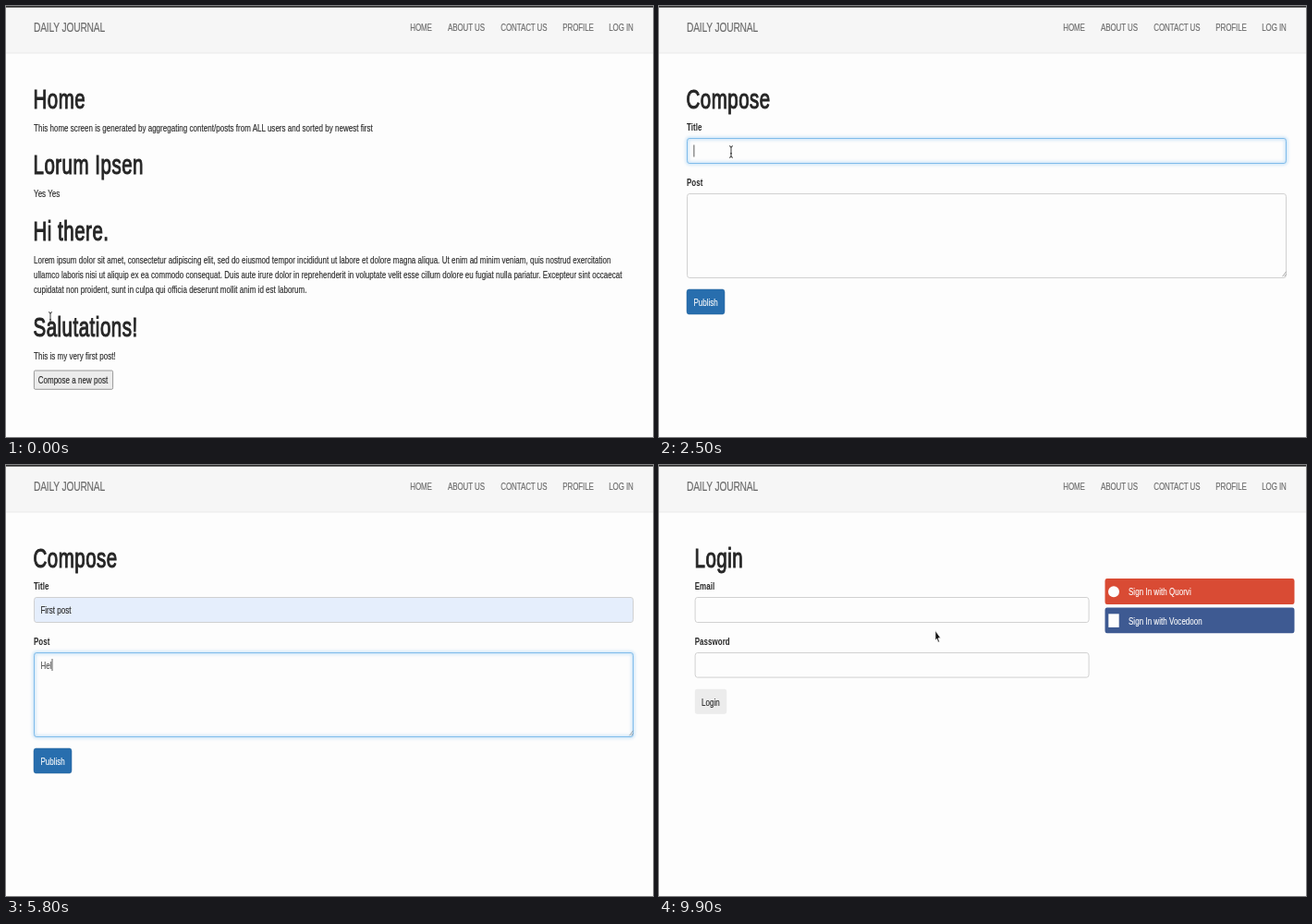
An HTML page that plays this animation: 700 by 467 pixels, repeating every 10000 ms.

```html
<!DOCTYPE html>
<html lang="en">
<head>
<meta charset="utf-8">
<title>Daily Journal</title>
<style>
  html, body { margin: 0; width: 100%; height: 100%; overflow: hidden; background: #fdfdfd; }
  svg { display: block; width: 100%; height: 100%; }
  text { font-family: "Liberation Sans", Arial, sans-serif; white-space: pre; }
  .glow { filter: blur(1.4px); }
</style>
</head>
<body>
<svg id="stage" viewBox="0 0 700 467"></svg>
<script>
const NS = 'http://www.w3.org/2000/svg';
const LOOP = 10000, STEP = 100;
// The whole page is shown squeezed by these factors.
const SX = 0.569, SY = 0.814;
const INK = '#262626', PAPER = '#fdfdfd', LINE = '#cccccc', FOCUS = '#78b8ea', NAV = '#6a6a6a';

function el(parent, tag, attrs) {
  const node = document.createElementNS(NS, tag);
  for (const key in attrs) node.setAttribute(key, attrs[key]);
  parent.appendChild(node);
  return node;
}

function text(parent, x, y, str, attrs) {
  const fill = attrs?.fill ?? INK;
  const node = el(parent, 'text', {
    transform: `translate(${x} ${y}) scale(${SX} ${SY})`,
    'font-size': 14, 'letter-spacing': 0.08, fill, stroke: fill, 'stroke-width': 0.2, ...attrs
  });
  node.textContent = str;
  return node;
}

const heading = (parent, x, y, str) => text(parent, x, y, str,
  { 'font-size': 36, 'letter-spacing': 0.9, 'stroke-width': 1.4 });

const label = (parent, x, y, str) => text(parent, x, y, str, { 'font-weight': 700, 'stroke-width': 0 });

const box = (parent, x, y, width, height, fill, attrs) => el(parent, 'rect',
  { x, y, width, height, rx: 2.3, ry: 3.2, fill, ...attrs });

const field = (parent, x, y, w, h) => box(parent, x + 0.5, y + 0.5, w - 1, h - 1, PAPER,
  { stroke: LINE, 'stroke-width': 0.9 });

function focusRing(parent, x, y, w, h) {
  const g = el(parent, 'g', {});
  const edge = { x: x + 0.5, y: y + 0.5, width: w - 1, height: h - 1, rx: 2.3, ry: 3.2, fill: 'none' };
  el(g, 'rect', { ...edge, class: 'glow', stroke: '#cfe6f8', 'stroke-width': 4 });
  el(g, 'rect', { ...edge, stroke: FOCUS, 'stroke-width': 0.9 });
  return g;
}

const show = (node, on) => node.setAttribute('display', on ? 'inline' : 'none');
const fade = (node, v) => node.setAttribute('opacity', v);

const stage = document.getElementById('stage');
el(stage, 'rect', { width: 700, height: 467, fill: PAPER });

// Navigation bar
el(stage, 'rect', { width: 700, height: 51, fill: '#f6f6f6' });
el(stage, 'rect', { y: 50.6, width: 700, height: 0.8, fill: '#e4e4e4' });
el(stage, 'rect', { width: 700, height: 1.6, fill: '#2a2a2a' });
text(stage, 30, 27.5, 'DAILY JOURNAL', { 'font-size': 18, fill: NAV, 'letter-spacing': -0.3 });
[[437.3, 'HOME'], [478, 'ABOUT US'], [535.3, 'CONTACT US'], [602.3, 'PROFILE'], [652.2, 'LOG IN']]
  .forEach(([x, str]) => text(stage, x, 27, str, { fill: NAV, 'letter-spacing': -0.15 }));

// Home
const home = el(stage, 'g', {});
[
  [110.5, 'Home', 'This home screen is generated by aggregating content/posts from ALL users and sorted by newest first'],
  [182, 'Lorum Ipsen', 'Yes Yes'],
  [253.5, 'Hi there.',
    'Lorem ipsum dolor sit amet, consectetur adipiscing elit, sed do eiusmod tempor incididunt ut labore et dolore magna aliqua. Ut enim ad minim veniam, quis nostrud exercitation',
    'ullamco laboris nisi ut aliquip ex ea commodo consequat. Duis aute irure dolor in reprehenderit in voluptate velit esse cillum dolore eu fugiat nulla pariatur. Excepteur sint occaecat',
    'cupidatat non proident, sunt in culpa qui officia deserunt mollit anim id est laborum.'],
  [357.5, 'Salutations!', 'This is my very first post!']
].forEach(([y, title, ...lines]) => {
  heading(home, 29.5, y, title);
  lines.forEach((str, i) => text(home, 30, y + 25 + i * 16.3, str));
});
box(home, 30.4, 395, 85.2, 20.3, '#ececec', { stroke: '#808080', 'stroke-width': 0.8, rx: 1.2, ry: 1.6 });
text(home, 34.7, 409.3, 'Compose a new post');

// Compose
const compose = el(stage, 'g', {});
heading(compose, 29.5, 110.5, 'Compose');
label(compose, 30, 135.3, 'Title');
label(compose, 30, 194.8, 'Post');
const titleField = field(compose, 30, 143, 649, 28);
field(compose, 30, 203, 649, 92);
const postRing = focusRing(compose, 30, 203, 649, 92);
el(compose, 'path', { d: 'M674.5 293.2l4-5.4M676.7 293.2l1.8-2.6', stroke: '#777', 'stroke-width': 0.6 });
const titleRing = focusRing(compose, 30, 143, 649, 28);
const titleText = text(compose, 37.4, 161.2, 'First post');
const postText = text(compose, 37.4, 220.6, '', { fill: '#505050' });
const caret = el(compose, 'rect', { width: 0.8, height: 13, fill: '#333' });
box(compose, 30, 307, 41, 27, '#286eae', { stroke: '#24629b', 'stroke-width': 0.5 });
text(compose, 37.4, 324.9, 'Publish', { fill: '#fdfdfd' });

const menu = el(compose, 'g', {});
box(menu, 30, 172, 110, 130, '#888', { class: 'glow', opacity: 0.5 });
box(menu, 30, 171.3, 109.5, 129, '#222222');
['First post', 'hello', 'Other Post', 'Second Post'].forEach((str, i) =>
  text(menu, 37, 196.8 + i * 29, str, { fill: '#f2f2f2', 'font-size': 13.8 }));

// Login
const login = el(stage, 'g', {});
heading(login, 38.5, 110.5, 'Login');
label(login, 38.7, 135.3, 'Email');
label(login, 38.7, 194.8, 'Password');
field(login, 38.6, 143, 427, 28);
field(login, 38.6, 203, 427, 27.6);
box(login, 38.8, 242.7, 34.4, 27, '#ececec');
text(login, 46, 260.5, 'Login');
box(login, 482.5, 123, 205, 28, '#d94b34');
box(login, 482.5, 154.5, 205, 27.7, '#3e5a92');
el(login, 'circle', { cx: 492, cy: 137.2, r: 6, fill: '#fdfdfd' });
el(login, 'rect', { x: 486.3, y: 161.3, width: 11.4, height: 14.6, fill: '#fdfdfd' });
text(login, 508, 141.4, 'Sign In with Quorvi', { fill: '#fdfdfd' });
text(login, 508, 172.6, 'Sign In with Vocedoon', { fill: '#fdfdfd' });

// Pointers, each with its hot spot at 0,0
const pointers = {
  arrow: el(stage, 'path', {
    d: 'M0 0V10.6L1.6 8.7L3 12.6L4.4 11.9L3 8.1H5.6Z',
    fill: '#111', stroke: '#fdfdfd', 'stroke-width': 0.6
  }),
  beam: el(stage, 'path', {
    d: 'M-2-6.3Q0-6.3 0-4.6Q0-6.3 2-6.3M0-4.8V4.8M-2 6.3Q0 6.3 0 4.6Q0 6.3 2 6.3M-1 1.8H1',
    fill: 'none', stroke: '#262626', 'stroke-width': 0.9
  }),
  hand: el(stage, 'path', {
    d: 'M-.8 0Q0-1 .8 0V4.6L4.2 5.6Q5 6 4.8 8L4 12.5H-1.2L-3.4 8.2Q-3.2 6.6-2 7.6L-.8 8.8Z',
    fill: '#fdfdfd', stroke: '#111', 'stroke-width': 0.8
  })
};

// time, x, y, pointer from that time on
const track = [
  [0, 48, 338, 'beam'], [100, 48, 338, 'beam'], [500, 70, 402, 'hand'], [700, 73, 406, 'hand'],
  [1000, 73, 406, 'arrow'], [1600, 73, 406, 'arrow'], [1900, 95, 185, 'arrow'],
  [2200, 78, 158, 'beam'], [3300, 78, 158, 'beam'], [3600, 83, 170, 'arrow'],
  [3800, 85, 177, 'arrow'], [4100, 62, 192, 'arrow'], [4300, 62, 192, 'arrow'],
  [4400, 68, 210, 'beam'], [4600, 79.3, 250, 'beam'], [5500, 79.3, 250, ''],
  [7700, 79.3, 250, 'beam'], [7900, 65.5, 285.5, 'beam'], [8100, 48.5, 325, 'hand'],
  [9000, 48.5, 325, 'arrow'], [9700, 48.5, 325, 'arrow'], [9900, 299, 179.5, 'arrow'],
  [LOOP, 299, 179.5, 'arrow']
];

const message = 'Hello world!';
const keyTimes = [5500, 5700, 5800, 6000, 6100, 6400, 6600, 6700, 6800, 6900, 7100, 7300];

const ramp = (t, from, to) => Math.min(1, Math.max(0, (t - from) / (to - from)));
const pulse = (t, on, off) => ramp(t, on, on + 200) - ramp(t, off, off + 200);
const during = (t, from, to) => t >= from && t < to;

function movePointer(t) {
  const i = track.findIndex(k => k[0] > t) - 1;
  const [t0, x0, y0, kind] = track[i], [t1, x1, y1] = track[i + 1];
  const p = ramp(t, t0, t1), e = p * p * (3 - 2 * p);
  for (const name in pointers) show(pointers[name], name === kind);
  if (kind) pointers[kind].setAttribute('transform',
    `translate(${x0 + (x1 - x0) * e} ${y0 + (y1 - y0) * e})`);
}

function moveCaret(t) {
  const inPost = t >= 4600;
  const last = [2300, 3300, 4600, ...keyTimes].filter(k => k <= t).pop();
  const on = last !== undefined && !during(t, 4300, 4600) && t < 8100 && (t - last) % 1000 < 500;
  show(caret, on);
  if (!on) return;
  const typed = inPost && postText.textContent ? postText.getComputedTextLength() * SX : 0;
  caret.setAttribute('x', 37.5 + typed);
  caret.setAttribute('y', inPost ? 210 : 150.5);
}

function render(ms) {
  const t = Math.floor(ms % LOOP / STEP) * STEP;
  show(home, t < 700);
  show(compose, during(t, 700, 8300));
  show(login, t >= 8300);

  const filled = t >= 4300;
  titleField.setAttribute('fill', filled ? '#e5eefc' : PAPER);
  show(titleText, filled);
  show(menu, during(t, 3300, 4300));
  fade(titleRing, pulse(t, 2300, 4600));
  fade(postRing, pulse(t, 4600, 8100));
  postText.textContent = message.slice(0, keyTimes.filter(k => k <= t).length);
  moveCaret(t);
  movePointer(t);
}

const start = performance.now();
function tick() {
  render(performance.now() - start);
  requestAnimationFrame(tick);
}
tick();
</script>
</body>
</html>
```
